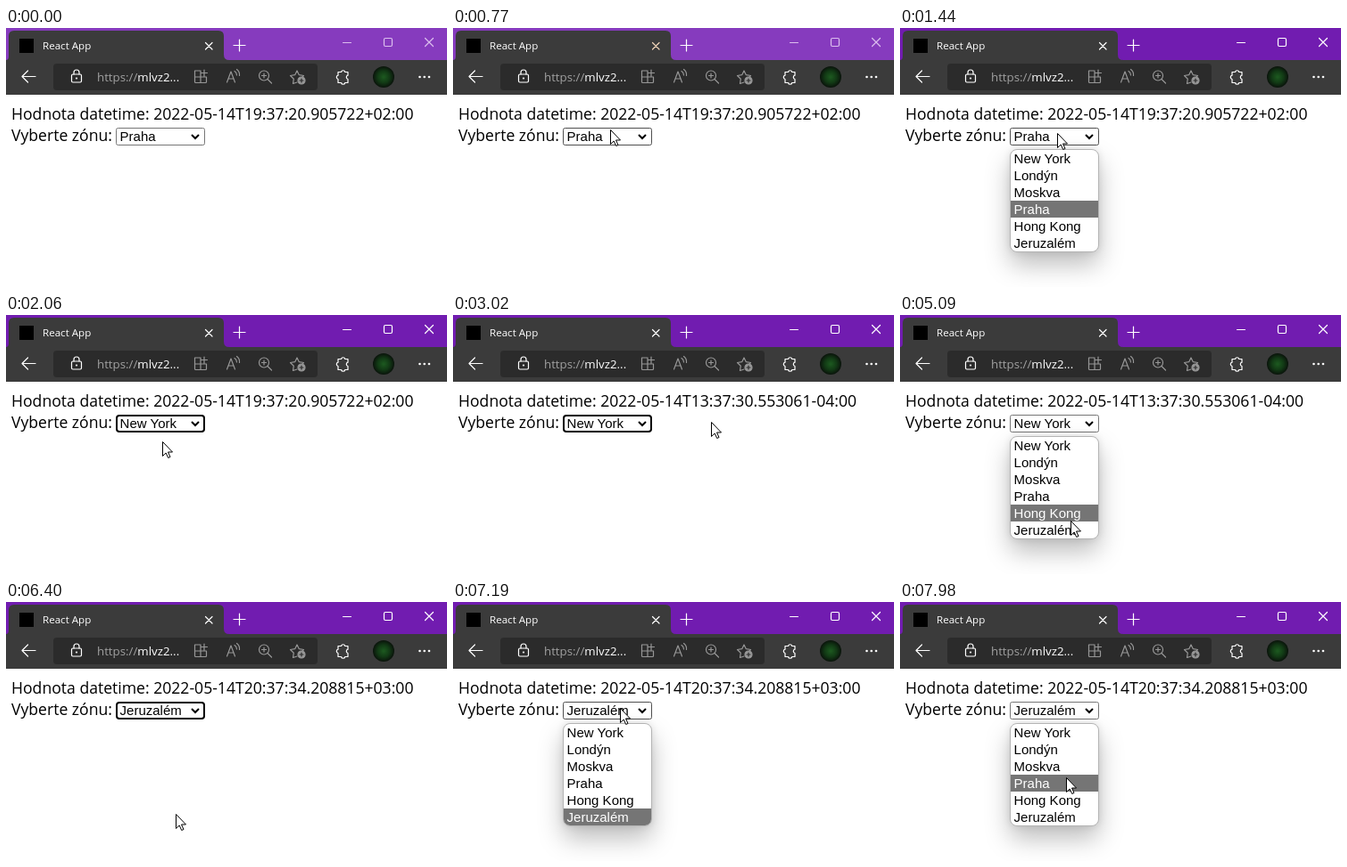
An HTML page for the animation above (8 s loop, 494 px wide and 291 px high).

```html
<!DOCTYPE html>
<html lang="cs">
<head>
<meta charset="utf-8">
<title>Time zones</title>
<style>
html, body { margin: 0; width: 100%; height: 100%; overflow: hidden; background: #fff; }
#stage { position: relative; width: 494px; height: 291px; overflow: hidden; background: #fff; }
svg { position: absolute; left: 0; top: 0; display: block; }
.ui { font-family: "Open Sans", sans-serif; fill: #fff; }
.page { font: 17.6px "Open Sans", sans-serif; fill: #000; }
.field { font: 15px "Liberation Sans", Arial, sans-serif; fill: #000; }
.line { fill: none; stroke: #fff; stroke-width: 1.2; stroke-linecap: round; stroke-linejoin: round; }
.dim { stroke: #979797; }
#popup {
  position: absolute; left: 123px; top: 136px; width: 98px; height: 114px;
  border: 1px solid #b4b4b4; border-radius: 8px; overflow: hidden; background: #fff;
  box-shadow: 0 14px 28px rgba(0,0,0,.26), 0 0 8px rgba(0,0,0,.1);
  font: 15px/19px "Liberation Sans", Arial, sans-serif; color: #000;
}
#popup div { height: 19px; padding-left: 3.6px; white-space: nowrap; }
#popup .on { background: #757575; color: #fff; }
</style>
</head>
<body>
<div id="stage">
<svg width="494" height="291" viewBox="0 0 494 291">
  <defs>
    <radialGradient id="avatar">
      <stop offset="0" stop-color="#1d5a20"/>
      <stop offset=".55" stop-color="#123a15"/>
      <stop offset="1" stop-color="#0a130b"/>
    </radialGradient>
  </defs>

  <!-- window frame -->
  <rect id="bar" width="494" height="37"/>
  <path fill="#3b3b3b" d="M0 36Q3 36 3 32V9Q3 3 9 3H238Q244 3 244 9V30Q244 36 250 36H494V75H0Z"/>
  <rect x="15" y="12" width="16" height="16" fill="#000"/>
  <text class="ui" x="41" y="24" font-size="11.6">React App</text>
  <path id="tabX" class="line" d="M223.5 16.5l7.5 7.5m0-7.5l-7.5 7.5"/>
  <path class="line" d="M255 19.5h13M261.5 13v13"/>
  <g id="controls" class="line">
    <path d="M377.500 16.500h9M469.500 11.500l9 9m0-9l-9 9"/>
    <rect x="423.500" y="11.500" width="9" height="9" rx="1.500"/>
  </g>

  <!-- toolbar -->
  <rect x="53" y="40" width="296" height="30" rx="4" fill="#2b2b2b"/>
  <path class="line" stroke-width="1.400" d="M33 54.500H18m6.500-6.500L18 54.500l6.500 6.500"/>
  <rect class="line" x="73.500" y="52" width="11" height="9" rx="1.500"/>
  <path class="line" d="M76 52v-2a3 3 0 0 1 6 0v2"/>
  <circle cx="79" cy="56.500" r="1.100" fill="#fff"/>
  <text class="ui" x="102" y="59.500" font-size="13.300"><tspan fill="#a0a0a0">https://</tspan><tspan>mlvz2...</tspan></text>
  <g class="line dim">
    <path d="M211.500 48h6.500v13.500h-5.500q-1 0-1-1ZM211.500 55h13v5.500q0 1-1 1H218M222 47v7M218.500 50.500h7"/>
    <path d="M247.500 61l4.500-12 4.500 12M249 57h6M256 48.500q2.500 1.500 2.500 4.500M258.500 46.500q3.500 2.500 3 7"/>
    <circle cx="289" cy="53.500" r="5.500"/>
    <path d="M293 57.500l4.500 4.500M286.500 53.500h5M289 51v5"/>
    <path d="M326 61l-4.500 1.500.8-5.300-3.800-3.700 5.200-.8 2.300-4.700 2.300 4.700 5.200.8-1.500 1.500"/>
    <circle cx="331" cy="59" r="4" fill="#979797"/>
    <path stroke="#2b2b2b" style="stroke:#2b2b2b" d="M329 59h4M331 57v4"/>
  </g>
  <path class="line" d="M372 49.500h3.500a2.200 2.200 0 0 1 4.300 0H383v3.700a2.200 2.200 0 0 0 0 4.300V61.500h-3.200a2.200 2.200 0 0 1-4.300 0H372V57.500a2.200 2.200 0 0 1 0-4.300Z"/>
  <circle cx="423" cy="55" r="12" fill="url(#avatar)"/>
  <g fill="#fff"><circle cx="463.500" cy="55" r="1.300"/><circle cx="468.700" cy="55" r="1.300"/><circle cx="474" cy="55" r="1.300"/></g>

  <!-- page -->
  <text class="page" x="6" y="103">Hodnota datetime: <tspan id="date"></tspan></text>
  <text class="page" x="6" y="127">Vyberte zónu:</text>
  <rect id="box" fill="#fff"/>
  <text id="value" class="field" x="127.600" y="127"></text>
  <path d="M208 120l4 4 4-4" fill="none" stroke="#000" stroke-width="2"/>
</svg>
<div id="popup"></div>
<svg width="494" height="291" viewBox="0 0 494 291">
  <path id="arrow" fill="#fff" stroke="#000" stroke-linejoin="round" d="M.5.500V16.500L4.200 13 6.700 18.500 9 17.500 6.500 12H11.500Z"/>
  <path id="beam" fill="none" stroke="#000" d="M-3.500-7.500H-1.500L0-6.500 1.500-7.500H3.500M0-6.500V6.500M-3.500 7.500H-1.500L0 6.500 1.500 7.500H3.500"/>
</svg>
</div>
<script>
const LOOP = 8000;
const ZONES = ["New York", "Londýn", "Moskva", "Praha", "Hong Kong", "Jeruzalém"];

// start time, then what holds from there on
const VALUES = [[0, 3], [1960, 0], [5490, 5]];
const DATES = [
  [0, "2022-05-14T19:37:20.905722+02:00"],
  [2160, "2022-05-14T13:37:30.553061-04:00"],
  [5660, "2022-05-14T20:37:34.208815+03:00"]
];
const OPENINGS = [[1030, 1960], [4600, 5490], [7110, LOOP]];

// from, to, start point, bend point, end point
const MOVES = [
  [240, 770, 440, 300, 260, 190, 176, 114],
  [1370, 1680, 176, 114, 178, 130, 175, 142],
  [2060, 2360, 175, 142, 205, 180, 248, 191],
  [2740, 3140, 248, 191, 310, 138, 281, 105],
  [3300, 3510, 281, 105, 276, 101, 270, 101],
  [3680, 3920, 270, 101, 300, 103, 328, 102],
  [4120, 4560, 319, 108, 250, 130, 188, 119],
  [4900, 5090, 188, 119, 192, 175, 191, 231],
  [5090, 5180, 191, 231, 191, 236, 190, 238],
  [6400, 7020, 190, 238, 196, 180, 187, 119],
  [7450, 7980, 187, 119, 190, 160, 186, 197]
];

const $ = id => document.getElementById(id);
const clamp = u => Math.min(1, Math.max(0, u));
const at = (steps, t) => steps.filter(s => s[0] <= t).pop()[1];
const mix = (a, b, u) => `rgb(${a.map((v, i) => Math.round(v + (b[i] - v) * u))})`;

function set(el, attrs) {
  for (const k in attrs) el.setAttribute(k, attrs[k]);
}

const rows = ZONES.map(name => {
  const row = document.createElement("div");
  row.textContent = name;
  $("popup").append(row);
  return row;
});

function pointer(t) {
  const [a, b, x0, y0, cx, cy, x1, y1] = MOVES.filter(m => m[0] <= t).pop() || MOVES[0];
  const k = clamp((t - a) / (b - a));
  const u = k * k * (3 - 2 * k), v = 1 - u;
  const curve = (p, c, q) => v * v * p + 2 * u * v * c + u * u * q;
  return [curve(x0, cx, x1), curve(y0, cy, y1)];
}

function drawWindow(t) {
  const focus = clamp((t - 1030) / 100);
  $("bar").style.fill = mix([134, 59, 190], [113, 28, 176], focus);
  $("controls").style.stroke = mix([220, 190, 238], [255, 255, 255], focus);
  $("tabX").style.stroke = t >= 30 && t < 1030 ? "#f0d4b8" : "#fff";
}

function drawSelect(t, x, y) {
  const value = at(VALUES, t);
  const open = OPENINGS.find(([a, b]) => t >= a && t < b);
  const ring = t >= 1960 && !open;
  const hover = x >= 123 && x < 223 && y >= 112 && y < 132;
  const w = ring ? 2 : 1;
  set($("box"), {
    x: 123 + w / 2, y: 112 + w / 2, width: 100 - w, height: 20 - w,
    rx: ring ? 3 : 2, "stroke-width": w,
    stroke: ring ? "#000" : hover ? "#4f4f4f" : "#767676"
  });
  $("value").textContent = ZONES[value];
  $("popup").style.opacity = open ? clamp(0.35 + (t - open[0]) / 120) : 0;
  const lit = y >= 137 ? Math.floor((y - 137) / 19) : value;
  rows.forEach((row, i) => row.classList.toggle("on", i === lit));
}

function drawPointer(x, y) {
  const overText = y > 84 && y < 109 && x < 456;
  const transform = `translate(${Math.round(x)} ${Math.round(y)})`;
  set($("arrow"), { transform, visibility: overText ? "hidden" : "visible" });
  set($("beam"), { transform, visibility: overText ? "visible" : "hidden" });
}

const start = performance.now();
function draw() {
  const t = (performance.now() - start) % LOOP;
  const [x, y] = pointer(t);
  drawWindow(t);
  $("date").textContent = at(DATES, t);
  drawSelect(t, x, y);
  drawPointer(x, y);
  requestAnimationFrame(draw);
}
draw();
</script>
</body>
</html>
```
